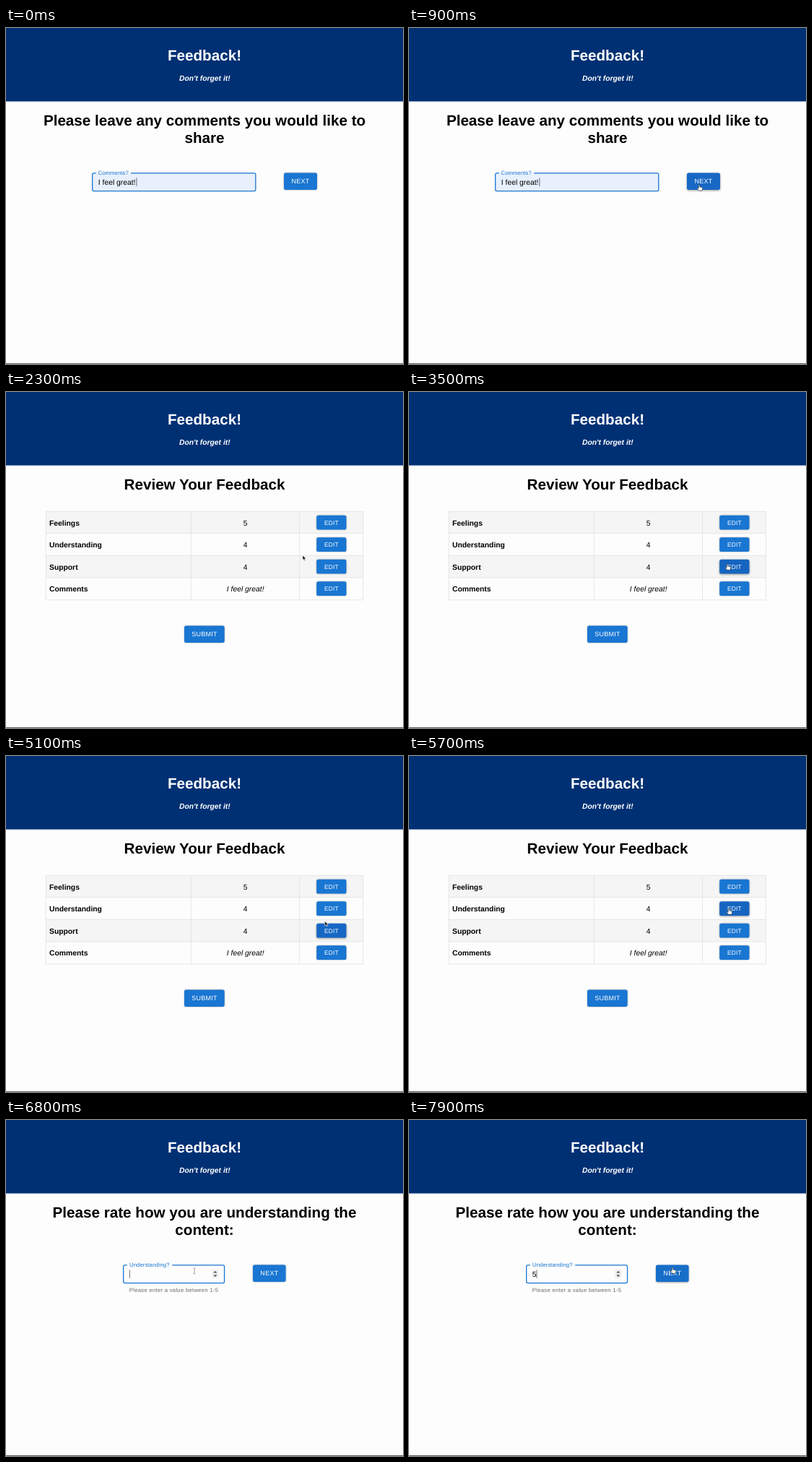
An HTML page for the animation above (8000 ms loop, 550 px wide and 465 px high).

```html
<!DOCTYPE html>
<html lang="en">
<head>
<meta charset="utf-8">
<title>Feedback form</title>
<style>
  html, body { margin: 0; width: 100%; height: 100%; overflow: hidden; background: #fdfdfd; }
  svg { display: block; width: 550px; height: 465px; }
  text {
    font-family: "Liberation Sans", Arial, sans-serif;
    font-size: 10.33px;
    text-rendering: geometricPrecision;
    white-space: pre;
  }
  .mid { text-anchor: middle; }
  .bold { font-weight: 700; }
  .ital { font-style: italic; }
  .h1 { font-size: 20.65px; font-weight: 700; text-anchor: middle; }
  .cap { font-size: 9.03px; letter-spacing: .258px; fill: #fff; text-anchor: middle; }
  .small { font-size: 8.39px; letter-spacing: .24px; }
  .label { font-size: 7.74px; letter-spacing: .07px; fill: #1976d2; }
  .help { font-size: 7.74px; letter-spacing: .258px; fill: #6a6a6a; }
  .outline { fill: none; stroke: #1976d2; stroke-width: 1.3; }
  .caret { stroke: #333; stroke-width: .7; }
</style>
</head>
<body>
<svg id="stage" viewBox="0 0 550 465" xmlns="http://www.w3.org/2000/svg">
  <rect width="550" height="465" fill="#fdfdfd"/>
  <rect width="550" height="101.6" fill="#003074"/>
  <text class="h1" x="275" y="45" fill="#fff">Feedback!</text>
  <text class="mid bold ital" x="275.3" y="73.2" fill="#fff">Don't forget it!</text>
  <g id="comments"></g>
  <g id="review"></g>
  <g id="rating"></g>
  <rect y="464" width="550" height="1" fill="#5c5c5c"/>
  <g id="pointer">
    <path id="arrow" d="M0 0V6.6L1.6 5.2L2.7 7.6L3.8 7.1L2.7 4.8H4.7Z" fill="#111" stroke="#fff" stroke-width=".6"/>
    <path id="hand" d="M-.8 .6Q0 -.5 .8 .6V3L4 3.6Q5 3.9 4.8 5L4 8.2H-.4L-2.8 5.2Q-2.6 4 -.8 5.2Z" fill="#fff" stroke="#222" stroke-width=".6"/>
    <path id="beam" d="M-1.3 -4Q0 -4 0 -3V3Q0 4 -1.3 4M1.3 -4Q0 -4 0 -3M0 3Q0 4 1.3 4" fill="none" stroke="#777" stroke-width=".7"/>
  </g>
</svg>
<script>
const LOOP = 8000, STEP = 100, FADE = 250;
const $ = id => document.getElementById(id);

function add(parent, tag, attrs, content) {
  const el = document.createElementNS("http://www.w3.org/2000/svg", tag);
  for (const k in attrs) el.setAttribute(k, attrs[k]);
  if (content) el.textContent = content;
  parent.appendChild(el);
  return el;
}
const text = (page, cls, x, y, s) => add($(page), "text", { class: cls, x, y }, s);
const line = (page, x1, y1, x2, y2) =>
  add($(page), "path", { d: `M${x1} ${y1}L${x2} ${y2}`, stroke: "#e0e0e0", "stroke-width": .8 });
const caret = (page, x) => add($(page), "path", { class: "caret", d: `M${x} 207.4V219` });

const buttons = [], fields = [];

function button(page, x, y, w, h, s, small = "") {
  const el = add($(page), "rect", { x, y, width: w, height: h, rx: 2.6 });
  text(page, "cap " + small, x + w / 2 + .1, y + h / 2 + (small ? 3 : 3.25), s);
  buttons.push({ page, x, y, w, h, el });
}

// Outline with a gap in the top edge for the floating label
function outline(page, x, w, gap) {
  const l = x + .65, r = x + w - .65, t = 200.9, b = 225.6, q = 2;
  fields.push({ page, x, y: 200, w, h: 26 });
  return add($(page), "path", { class: "outline",
    d: `M${x + 5.8} ${t}H${l + q}Q${l} ${t} ${l} ${t + q}V${b - q}Q${l} ${b} ${l + q} ${b}` +
       `H${r - q}Q${r} ${b} ${r} ${b - q}V${t + q}Q${r} ${t} ${r - q} ${t}H${gap}` });
}

// Comments page
text("comments", "h1", 275, 135, "Please leave any comments you would like to");
text("comments", "h1", 275, 158.7, "share");
add($("comments"), "rect", { x: 119.5, y: 200.9, width: 226.5, height: 24.8, rx: 2, fill: "#e7f0fc" });
outline("comments", 119, 227.5, 173);
text("comments", "label", 127.5, 203.1, "Comments?");
text("comments", "", 127.8, 216.7, "I feel great!");
caret("comments", 180.9);
button("comments", 385, 200.5, 46, 23.4, "NEXT");

// Review page
text("review", "h1", 275, 135, "Review Your Feedback");
const tops = [165.4, 195.7, 226.4, 256.8, 287.8];
[["Feelings", "5"], ["Understanding", "4"], ["Support", "4"], ["Comments", "I feel great!"]]
  .forEach(([name, value], i) => {
    const y = tops[i], base = 184.5 + i * 30.5;
    if (i % 2 == 0)
      add($("review"), "rect", { x: 55, y, width: 440, height: tops[i + 1] - y, fill: "#f5f5f5" });
    text("review", "bold", 60, base, name);
    text("review", i == 3 ? "mid ital" : "mid", 331.7, base, value);
  });
tops.forEach(y => line("review", 55, y, 495, y));
[55.3, 256.4, 406.6, 494.6].forEach(x => line("review", x, tops[0], x, tops[4]));
for (let i = 0; i < 4; i++) button("review", 430.2, 170.8 + i * 30.5, 41.3, 19.7, "EDIT", "small");
button("review", 247, 323.5, 55.7, 23.4, "SUBMIT");

// Rating page
text("rating", "h1", 275, 135, "Please rate how you are understanding the");
text("rating", "h1", 275, 158.7, "content:");
const idleBox = add($("rating"), "rect", { x: 162.5, y: 200.7, width: 140.2, height: 25.1, rx: 2.6,
  fill: "none", stroke: "#c4c4c4", "stroke-width": .8 });
const focusBox = outline("rating", 162, 141.2, 230.2);
const label = text("rating", "label", 171, 203.1, "Understanding?");
const typed = text("rating", "", 170.8, 216.7, "5");
const emptyCaret = caret("rating", 171.3), typedCaret = caret("rating", 177);
const spinner = add($("rating"), "g", {});
add(spinner, "rect", { x: 285.4, y: 207, width: 9, height: 12, rx: 1, fill: "#eeeeee" });
add(spinner, "path", { d: "M287.4 211.6L289.9 208.9L292.4 211.6ZM287.4 214.4L289.9 217.1L292.4 214.4Z", fill: "#444" });
text("rating", "help", 170.8, 238, "Please enter a value between 1-5");
button("rating", 342, 200.5, 45.6, 23.4, "NEXT");

// Pointer stops: time, x, y
const track = [
  [0, 262, 214], [900, 402, 217], [2000, 402, 217], [2300, 411, 226],
  [2600, 411, 226], [3500, 441, 238], [4900, 441, 238], [5400, 443, 211],
  [5800, 443, 211], [6500, 261, 209], [7500, 261, 209], [7900, 365, 204], [8000, 365, 204]
];
const FOCUS = 6600, TYPED = 7100;

const clamp = v => Math.min(1, Math.max(0, v));
const mix = (a, b, u) => a + (b - a) * u;
const blend = (a, b, u) => `rgb(${a.map((v, i) => Math.round(mix(v, b[i], u)))})`;
const show = (el, on) => { el.style.display = on ? "" : "none"; };
const pageAt = t => t < 1300 ? "comments" : t < 5800 ? "review" : "rating";

function pointerAt(t) {
  const i = Math.max(1, track.findIndex(k => k[0] >= t));
  const [a, ax, ay] = track[i - 1], [b, bx, by] = track[i];
  const u = clamp((t - a) / (b - a)), e = u * u * (3 - 2 * u);
  return [mix(ax, bx, e), mix(ay, by, e)];
}

function hit(o, t) {
  const [x, y] = pointerAt(t);
  return pageAt(t) == o.page && x >= o.x && x <= o.x + o.w && y >= o.y && y <= o.y + o.h;
}

// Share of the last moments spent over a button
function hover(b, t) {
  let n = 0;
  for (let i = 0; i < 10; i++) n += t >= i * FADE / 10 && hit(b, t - i * FADE / 10);
  return n / 10;
}

function draw(t) {
  const page = pageAt(t);
  ["comments", "review", "rating"].forEach(p => show($(p), p == page));

  for (const b of buttons) {
    if (b.page != page) continue;
    const u = hover(b, t);
    b.el.style.fill = blend([25, 118, 210], [21, 101, 192], u);
    b.el.style.filter =
      `drop-shadow(0 ${mix(.9, 1.6, u)}px ${mix(.8, 1.6, u)}px rgba(0,0,0,${mix(.32, .42, u)}))`;
  }

  const f = clamp((t - FOCUS) / 200);
  show(idleBox, f == 0);
  show(focusBox, f > 0);
  label.style.fontSize = mix(10.33, 7.74, f) + "px";
  label.setAttribute("y", mix(216.7, 203.1, f));
  label.style.fill = blend([102, 102, 102], [25, 118, 210], f);
  show(typed, t >= TYPED);
  show(typedCaret, t >= TYPED);
  show(emptyCaret, f > 0 && t < TYPED);
  show(spinner, f > 0 || fields.some(o => hit(o, t)));

  // Typing hides the pointer until it moves again
  show($("pointer"), t >= 100 && !(t >= TYPED && t < 7600));
  const [x, y] = pointerAt(t);
  $("pointer").setAttribute("transform", `translate(${x} ${y})`);
  const kind = buttons.some(o => hit(o, t)) ? "hand" : fields.some(o => hit(o, t)) ? "beam" : "arrow";
  ["arrow", "hand", "beam"].forEach(k => show($(k), k == kind));
}

const start = performance.now();
function tick() {
  const t = (performance.now() - start) % LOOP;
  draw(Math.floor(t / STEP) * STEP);
  requestAnimationFrame(tick);
}
tick();
</script>
</body>
</html>
```
